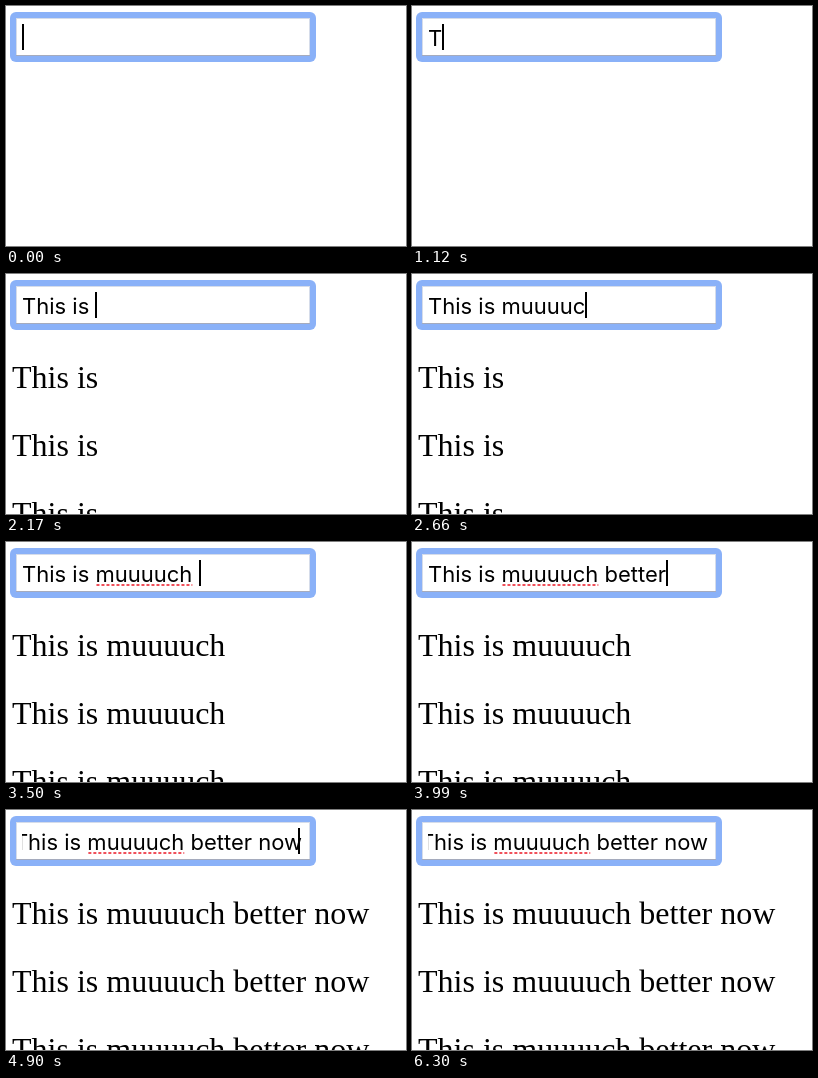
An HTML page with a canvas for the animation above (6370 ms loop, 400x240 px).

```html
<!DOCTYPE html>
<html lang="en">
<head>
<meta charset="utf-8">
<title>Delayed list</title>
<style>
  html, body { margin: 0; width: 100%; height: 100%; overflow: hidden; background: #fff; }
  canvas { display: block; width: 400px; height: 240px; }
</style>
</head>
<body>
<canvas id="stage" width="400" height="240"></canvas>
<script>
const ctx = document.getElementById('stage').getContext('2d');
const LOOP = 6370;
const TEXT = 'This is muuuuch better now';
const WORD = 'muuuuch';
const WORD_AT = TEXT.indexOf(WORD);

// Time of each key press
const KEYS = [
  1050, 1190, 1330, 1470, 1610, 1680, 1750, 1820,
  2240, 2310, 2380, 2520, 2590, 2660, 2800, 2940,
  3570, 3640, 3710, 3780, 3920, 3990, 4130, 4270, 4410, 4550
];
const SPELLCHECK = 3010;
// [time, letters shown in the list]
const LIST = [[2170, 7], [3500, 15], [4900, 26]];
const CARET_FLIPS = [420, 1050, 5110, 5600, 6090];

const FIELD = { left: 16, right: 296, baseline: 40 };
const INPUT_FONT = '22px Inter, sans-serif';
const LIST_FONT = '32px "Liberation Serif", Times, serif';

const passed = (times, t) => times.filter(at => at <= t).length;

function drawFrame() {
  ctx.fillStyle = '#8ab1f8';
  ctx.beginPath();
  ctx.roundRect(4, 6, 306, 50, 6);
  ctx.fill();
  ctx.fillStyle = '#d5dcea';
  ctx.fillRect(10, 12, 294, 38);
  ctx.fillStyle = '#a5abbd';
  ctx.fillRect(10, 49, 294, 1);
  ctx.fillStyle = '#fff';
  ctx.fillRect(11, 13, 292, 36);
}

function drawUnderline(x, width) {
  ctx.strokeStyle = '#f0505a';
  ctx.lineWidth = 2;
  ctx.setLineDash([3, 2]);
  ctx.beginPath();
  ctx.moveTo(x, 43);
  ctx.lineTo(x + width, 43);
  ctx.stroke();
  ctx.setLineDash([]);
}

function drawInput(t) {
  const typed = TEXT.slice(0, passed(KEYS, t));
  ctx.font = INPUT_FONT;
  const widthOf = text => ctx.measureText(text).width;
  const end = FIELD.left + widthOf(typed);
  const scroll = Math.max(0, end - FIELD.right);

  ctx.save();
  ctx.beginPath();
  ctx.rect(FIELD.left, 13, FIELD.right - FIELD.left, 36);
  ctx.clip();
  ctx.fillStyle = '#000';
  ctx.fillText(typed, FIELD.left - scroll, FIELD.baseline);
  if (t >= SPELLCHECK) {
    const x = FIELD.left + widthOf(TEXT.slice(0, WORD_AT)) - scroll;
    drawUnderline(x + 1, widthOf(WORD) - 1);
  }
  if (passed(CARET_FLIPS, t) % 2 === 0) {
    ctx.fillStyle = '#000';
    ctx.fillRect(Math.min(Math.round(end), FIELD.right - 4), 18, 2, 26);
  }
  ctx.restore();
}

function drawList(t) {
  const shown = passed(LIST.map(([at]) => at), t);
  if (!shown) return;
  const line = TEXT.slice(0, LIST[shown - 1][1]);
  ctx.font = LIST_FONT;
  ctx.fillStyle = '#000';
  for (let y = 114; y < 270; y += 68) ctx.fillText(line, 6, y);
}

function draw(now) {
  const t = now % LOOP;
  ctx.fillStyle = '#fff';
  ctx.fillRect(0, 0, 400, 240);
  drawFrame();
  drawInput(t);
  drawList(t);
}

const start = performance.now();
function tick() {
  draw(performance.now() - start);
  requestAnimationFrame(tick);
}
tick();
</script>
</body>
</html>
```
